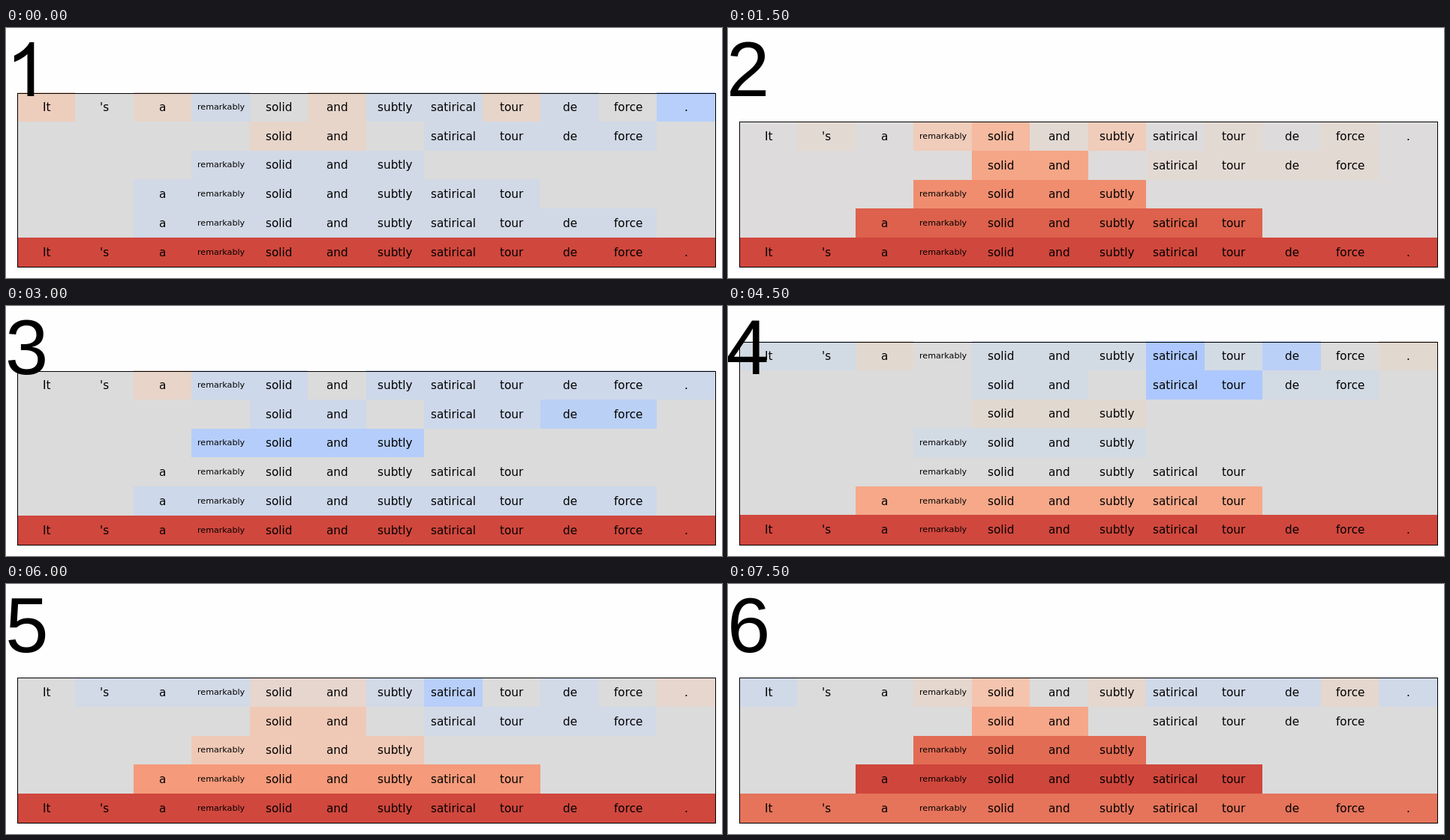
Recreate the animation shown at these times as an HTML page. Size 954 by 334 pixels, loop 8000 ms.

```html
<!DOCTYPE html>
<html lang="en">
<head>
<meta charset="utf-8">
<title>Phrase scores by step</title>
<style>
  html, body { margin: 0; width: 100%; height: 100%; overflow: hidden; background: #fefefe; }
  svg { display: block; width: 954px; height: 334px; }
  rect { shape-rendering: crispEdges; }
  .scene { opacity: 0; }
  .word { font: 15.28px "DejaVu Sans", sans-serif; }
  .word.long { font-size: 11.11px; }
  .step { font: 103px "Liberation Sans", Arial, sans-serif; }
</style>
</head>
<body>
<svg id="stage" viewBox="0 0 954 334"></svg>
<script>
const LOOP = 8000, HOLD = 1500;
const LEFT = 15, RIGHT = 945, BOTTOM = 319, COL = 77.5, ROW = 38.7;
const WORDS = "It|'s|a|remarkably|solid|and|subtly|satirical|tour|de|force|.".split('|');

// Exact table bottom by row count, before snapping to pixels.
const BASE = { 5: 319.12, 6: 318.9, 7: 318.6 };

// One letter per cell: '-' is empty, 'n' is neutral, others pick a colour.
const SCENES = [
  {
    x: 0,
    colors: { n: '#dbdbdb', b: '#d1d9e6', B: '#b7cffa', p: '#e7d5ca', o: '#edcdbc', r: '#d0473d' },
    rows: ['onpbnpbbpbnB', '----pp-bbbb-', '---bbbb-----', '--bbbbbbb---', '--bbbbbbbbb-', 'rrrrrrrrrrrr']
  },
  {
    x: -2,
    colors: { n: '#dddbdb', p: '#e3d9d3', o: '#f0ccba', s: '#f5baa0', t: '#f5a687', u: '#f08d6f', v: '#dd614c', r: '#d0473d' },
    rows: ['npnosponpnpn', '----tt-pppp-', '---uuuu-----', '--vvvvvvv---', 'rrrrrrrrrrrr']
  },
  {
    x: -1,
    colors: { n: '#dbdbdb', b: '#cdd8ea', B: '#bbd0f5', C: '#b5cdfa', p: '#e8d4c8', r: '#d0473d' },
    rows: ['nnpbbnbbbbbb', '----bb-bbBB-', '---CCCC-----', '--nnnnnnn---', '--bbbbbbbbb-', 'rrrrrrrrrrrr']
  },
  {
    x: -2.8,
    colors: { n: '#dbdbdb', b: '#d2dae4', B: '#bbd0f7', C: '#adc8fe', p: '#e1d8d0', t: '#f6a889', r: '#d0473d' },
    rows: ['bbpnbbbCbBnp', '----bb-CCbb-', '----ppp-----', '---bbbb-----', '---nnnnnn---', '--ttttttt---', 'rrrrrrrrrrrr']
  },
  {
    x: -0.8,
    colors: { n: '#dbdbdb', b: '#d2d9e7', B: '#b8cff9', p: '#e6d6ce', o: '#f0c9b6', t: '#f59a7a', r: '#d0473d' },
    rows: ['nbbbppbBnbnp', '----oo-bbbb-', '---oooo-----', '--ttttttt---', 'rrrrrrrrrrrr']
  },
  {
    x: -1,
    colors: { n: '#dbdbdb', b: '#d0d9e8', p: '#e5d7ce', o: '#f4c4ae', t: '#f6a789', u: '#e26b53', v: '#cf463c', r: '#e5745b' },
    rows: ['bnnponpbbbpb', '----tt-nnnn-', '---uuuu-----', '--vvvvvvv---', 'rrrrrrrrrrrr']
  }
];

function add(parent, tag, attrs, text) {
  const el = document.createElementNS('http://www.w3.org/2000/svg', tag);
  for (const key in attrs) el.setAttribute(key, attrs[key]);
  if (text) el.textContent = text;
  return parent.appendChild(el);
}

const colEdge = i => Math.floor(LEFT + COL * i);

// Centres a word in its column, starting on a whole pixel.
function drawWord(group, column, middle) {
  const long = WORDS[column].length > 9;
  const word = add(group, 'text', {
    class: long ? 'word long' : 'word',
    y: middle + (long ? 3 : 5)
  }, WORDS[column]);
  const center = LEFT + COL * (column + 0.5);
  word.setAttribute('x', Math.round(center - word.getComputedTextLength() / 2));
}

function drawTable(group, { rows, colors }) {
  const count = rows.length, base = BASE[count];
  const top = Math.floor(base - ROW * count + 0.35);
  const rowEdge = i => i === count ? BOTTOM : Math.floor(base - ROW * (count - i));

  add(group, 'rect', { x: LEFT, y: top, width: RIGHT - LEFT, height: BOTTOM - top, fill: colors.n });
  rows.forEach((row, r) => {
    const y = rowEdge(r), height = rowEdge(r + 1) - y;
    const middle = Math.round(base - ROW * (count - r - 0.5));
    [...row].forEach((cell, c) => {
      if (cell === '-') return;
      const x = colEdge(c);
      if (cell !== 'n') add(group, 'rect', { x, y, width: colEdge(c + 1) - x, height, fill: colors[cell] });
      drawWord(group, c, middle);
    });
  });
  add(group, 'rect', {
    x: LEFT + 0.5, y: top + 0.5, width: RIGHT - LEFT, height: BOTTOM - top,
    fill: 'none', stroke: '#000'
  });
}

function drawStep(group, number, x) {
  if (number > 1) {
    add(group, 'text', { class: 'step', x, y: 91 }, String(number));
    return;
  }
  // The figure one has no foot.
  add(group, 'path', { d: 'M37.3 91H28.5V35Q22 41 10.9 45.6V37.1Q26 30 31.6 19.1H37.3Z' });
}

// Keyframes that are on only from start to end, with no repeated offsets.
function showBetween(start, end) {
  const offsets = [...new Set([0, start, end, 1])];
  return offsets.map(offset => ({
    offset,
    opacity: offset >= start && (offset < end || end === 1) ? 1 : 0,
    easing: 'step-end'
  }));
}

SCENES.forEach((scene, i) => {
  const group = add(document.getElementById('stage'), 'g', { class: 'scene' });
  drawTable(group, scene);
  drawStep(group, i + 1, scene.x);

  const start = i * HOLD / LOOP, end = Math.min(1, (i + 1) * HOLD / LOOP);
  group.animate(showBetween(start, end), { duration: LOOP, iterations: Infinity, fill: 'both' });
});
</script>
</body>
</html>
```
